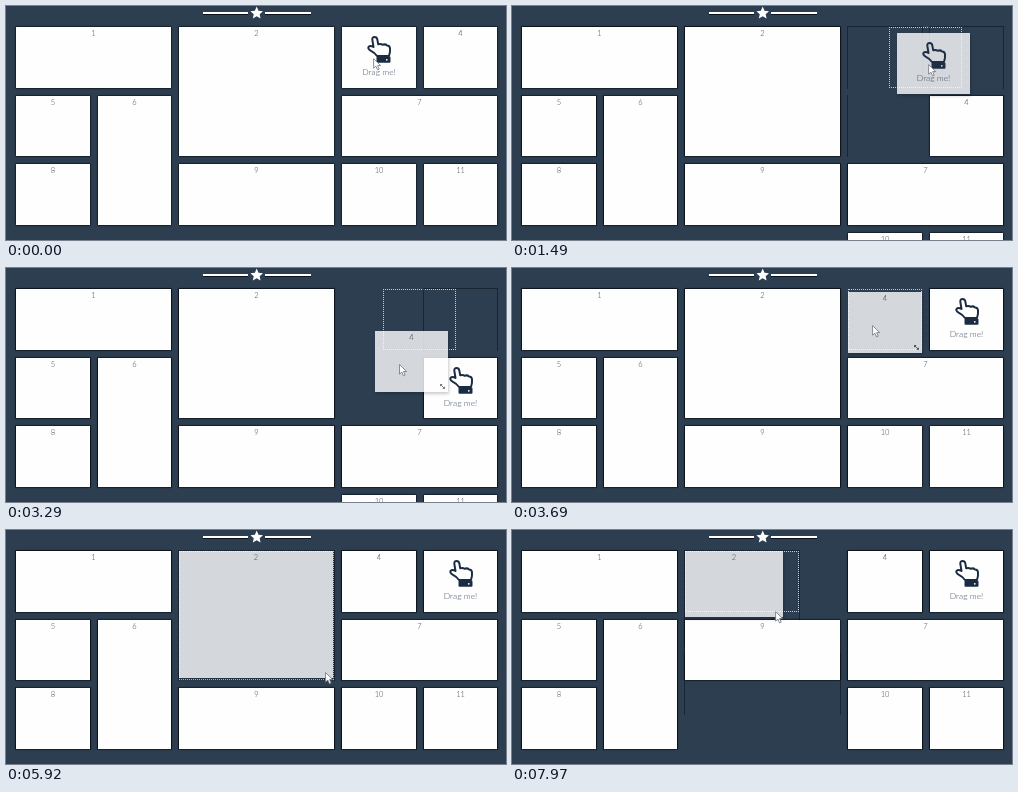
Animation, 500 px wide and 234 px high, one loop 8000 ms. Source, as an HTML page:

```html
<!DOCTYPE html>
<html lang="en">
<head>
<meta charset="utf-8">
<title>Tile grid</title>
<style>
html, body { margin: 0; width: 100%; height: 100%; overflow: hidden; background: #2c3e50; }
#stage { position: absolute; inset: 0; overflow: hidden; font: 300 7.5px/9px Lato, sans-serif; color: #3c454f; }
#stage > * { position: absolute; box-sizing: border-box; }
.tile { background: #fefefe; box-shadow: 0 0 2px #000, 0 0 1px #000; text-align: center; padding-top: 2px; z-index: 1; }
.tile.held { opacity: .8; z-index: 5; box-shadow: 1px 2px 3px rgba(0, 0, 0, .25); }
.tile svg { position: absolute; }
.hand { left: 0; top: 0; }
.grip { right: 3px; bottom: 3px; visibility: hidden; }
.hover .grip { visibility: visible; }
.label { position: absolute; left: 0; right: 0; top: 41px; font-size: 8.5px; color: #40536b; white-space: nowrap; }
.ghost { border: solid rgba(6, 12, 20, .5); border-width: 0 1px; margin: -1px; padding: 1px; }
#slot { border: 1px dotted #c5ccd2; }
#cursor { left: 0; top: 0; z-index: 9; }
</style>
</head>
<body>
<div id="stage">
  <svg width="500" height="16" style="left:0;top:0">
    <path d="M197 8.5h45M259 8.5h46" stroke="#0b1420"/>
    <path d="M197 7h45M259 7h46" stroke="#fff" stroke-width="2"/>
    <path id="star" fill="#fff"/>
  </svg>
  <div id="slot"></div>
  <svg id="cursor" width="10" height="14">
    <path d="M.6 .6V10.2L2.9 8.2 4.5 11.9 6.2 11.1 4.6 7.6H7.7Z" fill="#fff" stroke="#6b747d" stroke-width=".8"/>
  </svg>
</div>
<script>
const LOOP = 8000, LAG = 1000;
const LEFT = 10, TOP = 21, COL = 40.75, ROW = 34.25, GAP = 8;
const stage = document.getElementById('stage');
const slot = document.getElementById('slot');
const cursor = document.getElementById('cursor');

const HAND = `<svg class="hand" width="74" height="61" fill="none" stroke="#1b2c42" stroke-width="2" stroke-linejoin="round">
  <path d="M31.5 20L30.3 12.6Q30.2 10 32.6 10Q34.8 10 35.3 12.4L36.2 17.2Q39 16.4 40.6 17.7Q43.4 16.8 44.9 18.4Q47.8 18.3 48 21.3Q48.4 25 47 29H35Q32.5 25.5 28.6 23.6Q25.4 21.6 26.6 19.8Q28.2 18 31.5 20Z"/>
  <rect x="35.5" y="30.5" width="12" height="4.3" fill="#1b2c42"/><circle cx="44.8" cy="32.8" r=".9" fill="#fff" stroke="none"/></svg>
  <span class="label">Drag me!</span>`;
const GRIP = `<svg class="grip" width="5" height="5" fill="none" stroke="#2b333c" stroke-width=".8">
  <path d="M.5 2.2V.5H2.2M.5 .5L4.5 4.5M2.8 4.5H4.5V2.8"/></svg>`;

// Column and size in grid cells; rows follow from packing upwards.
const tile = (name, col, w = 2, h = 2) => ({ name, col, w, h });
const TILES = [tile('1', 0, 4), tile('2', 4, 4, 4), tile('drag', 8), tile('4', 10), tile('5', 0),
  tile('6', 2, 2, 4), tile('7', 8, 4), tile('8', 0), tile('9', 4, 4), tile('10', 8), tile('11', 10)];

// Cursor moves: start, end, target x, y
const START = [367, 52];
const MOVES = [[360, 460, 374, 57], [460, 560, ...START], [980, 1490, 416, 58], [1490, 2180, 448, 56],
  [2660, 2950, 442, 123], [2950, 3290, 393, 96], [3290, 3690, 360, 57], [4220, 4630, 346, 147],
  [5220, 5570, 319, 142], [5920, 6380, 283, 107], [6380, 6550, 278, 102], [6970, 7250, 266, 89],
  [7430, 7550, 263, 81]];

// dx, dy: from the grabbed corner to the cursor
const GRABS = [
  { name: 'drag', from: 980, to: 2420, dx: 31, dy: 31 },
  { name: '4', from: 2950, to: 3980, dx: 24, dy: 33 },
  { name: '2', from: 5920, to: LOOP, dx: -8, dy: -6, resize: true }
];

function cursorAt(t) {
  let [x, y] = START;
  for (const [from, to, tx, ty] of MOVES) {
    const k = Math.min(1, Math.max(0, (t - from) / (to - from)));
    x += (tx - x) * k;
    y += (ty - y) * k;
  }
  return [x, y];
}

function box({ col, row, w, h }) {
  const x = Math.round(LEFT + col * COL), y = Math.round(TOP + row * ROW);
  return [x, y, Math.round(LEFT + (col + w) * COL - GAP) - x, Math.round(TOP + (row + h) * ROW - GAP) - y];
}

// Each tile rises until it meets one placed before it.
function pack(list) {
  const floor = Array(12).fill(0), cells = {};
  for (const t of list) {
    const row = Math.max(...floor.slice(t.col, t.col + t.w));
    floor.fill(row + t.h, t.col, t.col + t.w);
    cells[t.name] = { ...t, row };
  }
  return cells;
}

// Snapped layout at a time; a tile that leaves its column goes first.
function layout(time) {
  let list = TILES.map(t => ({ ...t }));
  for (const g of GRABS.filter(g => time >= g.from)) {
    const [cx, cy] = cursorAt(Math.min(time, g.to));
    const x = cx - g.dx, y = cy - g.dy;
    const t = list.find(t => t.name === g.name);
    if (g.resize) {
      t.w = Math.round((x - LEFT + GAP) / COL) - t.col;
      t.h = Math.round((y - TOP + GAP) / ROW);
      continue;
    }
    const col = Math.round((x - LEFT) / COL);
    if (col !== t.col) {
      t.col = col;
      list = [t, ...list.filter(o => o !== t)];
    }
  }
  return pack(list);
}

function place(el, [x, y, w, h]) {
  Object.assign(el.style, { left: x + 'px', top: y + 'px', width: w + 'px', height: h + 'px' });
}

function add(className, html = '') {
  const el = document.createElement('div');
  el.className = className;
  el.innerHTML = html;
  return stage.insertBefore(el, cursor);
}

const ghosts = {}, els = {};
for (const { name } of TILES) {
  ghosts[name] = add('ghost');
  els[name] = add('tile', name === 'drag' ? HAND : name + GRIP);
}

document.getElementById('star').setAttribute('d', 'M' + Array.from({ length: 10 }, (_, i) => {
  const r = i % 2 ? 3.1 : 6.6, a = i * Math.PI / 5;
  return (250.7 + r * Math.sin(a)).toFixed(2) + ' ' + (7.2 - r * Math.cos(a)).toFixed(2);
}).join('L') + 'Z');

function draw(t) {
  const cells = layout(t), old = layout(t - LAG);
  const grab = GRABS.find(g => t >= g.from && t < g.to);
  const [cx, cy] = cursorAt(t);
  cursor.style.transform = `translate(${cx}px, ${cy}px)`;
  slot.style.display = grab ? 'block' : 'none';

  for (const name in els) {
    const held = grab && grab.name === name;
    let b = box(cells[name]);
    if (held) {
      place(slot, b);
      const x = cx - grab.dx, y = cy - grab.dy;
      b = grab.resize ? [b[0], b[1], x - b[0], y - b[1]] : [x, y, b[2], b[3]];
    }
    place(els[name], b);
    const over = cx >= b[0] && cy >= b[1] && cx < b[0] + b[2] && cy < b[1] + b[3];
    els[name].classList.toggle('held', !!held);
    els[name].classList.toggle('hover', over && !(held && grab.resize));

    // Shadow edges linger where a tile stood before.
    const { row } = old[name], ghost = ghosts[name];
    ghost.style.display = grab && row < 6 ? 'block' : 'none';
    ghost.style.borderTopWidth = row ? 0 : '1px';
    const [x, y, w, h] = box(old[name]);
    place(ghost, [x, y, w + 2, h + 2]);
  }
}

const start = performance.now();
function tick() {
  draw((performance.now() - start) % LOOP);
  requestAnimationFrame(tick);
}
tick();
</script>
</body>
</html>
```
